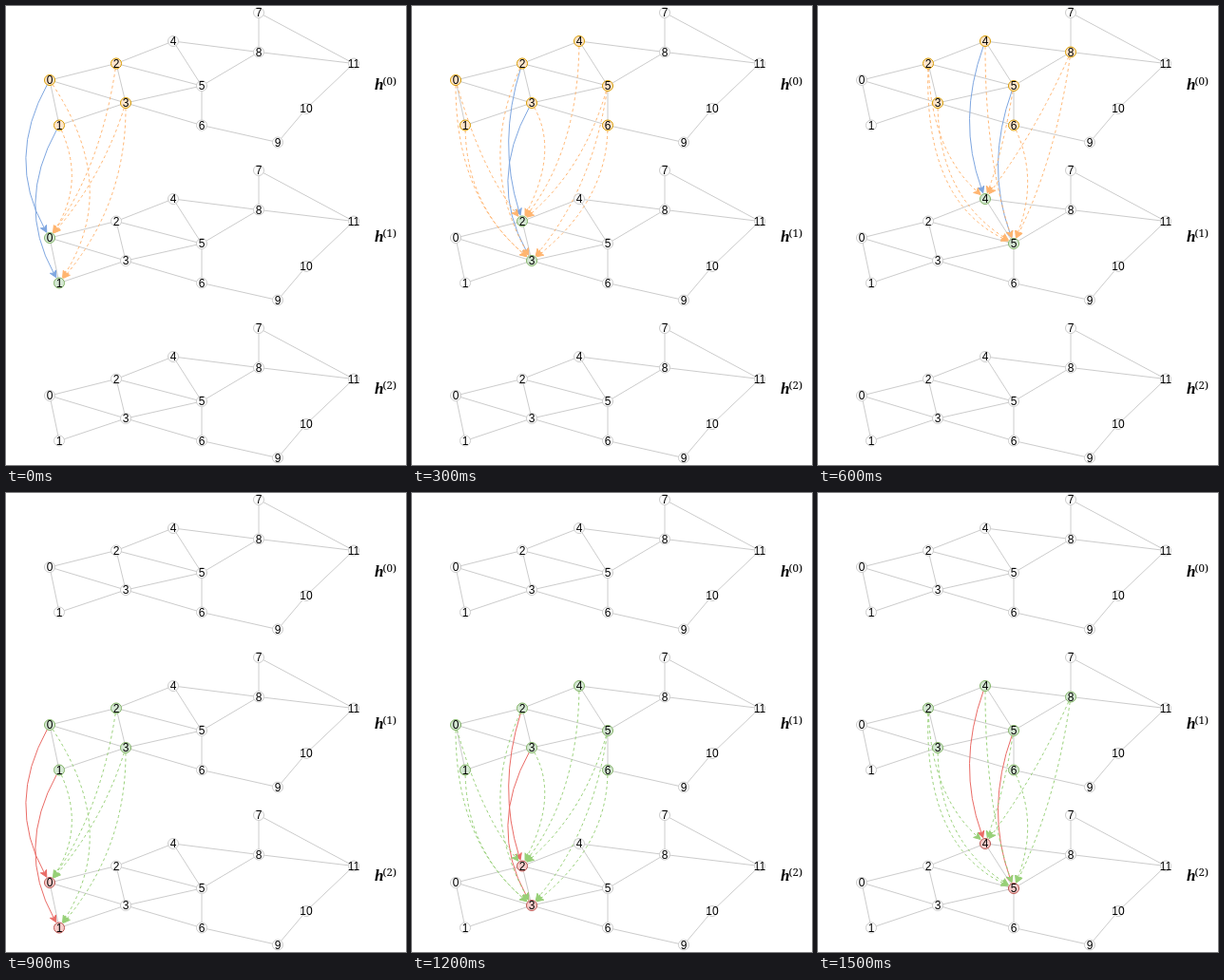
An HTML page for the animation above (1.8 s loop, 421x483 px).

```html
<!DOCTYPE html>
<html lang="en">
<head>
<meta charset="utf-8">
<title>Neighbourhood aggregation</title>
<style>
  html, body { margin: 0; width: 100%; height: 100%; overflow: hidden; background: #fff; }
  svg { display: block; }
  .edge { stroke: #ccc; }
  .num { font: 12px "Liberation Sans", Arial, sans-serif; text-anchor: middle; }
  .sym { font: italic bold 17px "Liberation Serif", Times, serif; }
  .sup { font: 11.5px "Noto Serif", serif; }
</style>
</head>
<body>
<svg id="stage" width="421" height="483" viewBox="0 0 421 483"></svg>
<script>
const STEP_MS = 300, LAYER_DY = 166, RADIUS = 5.5;

const nodes = [
  [46, 78], [56, 125.5], [116, 60.5], [126, 102], [176, 37], [206, 84],
  [206, 125.5], [266, 7], [266, 48.5], [286, 143.5], [316, 108], [366, 60.5]
];

const edges = ('0-1 0-2 0-3 1-3 2-3 2-4 2-5 3-5 3-6 4-5 4-8 5-6 5-8 ' +
  '6-9 7-8 7-11 8-11 9-10 10-11').split(' ').map(e => e.split('-'));

// Each arrow: from, to (one layer below), control point of its curve.
const groups = [
  [[0, 0, 0, 161], [1, 1, 10, 208.5],
   [1, 0, 83, 186], [2, 0, 100, 167], [3, 0, 102, 178], [0, 1, 120, 190], [3, 1, 126, 208]],
  [[2, 2, 90, 143.5], [3, 3, 80, 185],
   [0, 2, 72, 170], [3, 2, 154, 152], [4, 2, 174, 150], [5, 2, 181, 170],
   [0, 3, 46, 200], [1, 3, 58, 210], [2, 3, 69, 166], [5, 3, 190, 190], [6, 3, 204, 205]],
  [[4, 4, 146, 120], [5, 5, 176, 167],
   [2, 4, 120, 152], [5, 4, 195, 150], [8, 4, 230, 130],
   [2, 5, 112, 205], [3, 5, 128, 200], [4, 5, 176, 160], [6, 5, 232, 182], [8, 5, 250, 160]]
];

const layerColors = [
  { fill: '#ffe6cc', stroke: '#d79b00' },
  { fill: '#d5e8d4', stroke: '#82b366' },
  { fill: '#f8cecc', stroke: '#b85450' }
];
const idleColors = { fill: '#fff', stroke: '#ccc' };
const arrowColors = [
  { self: '#7ea6e0', other: '#ffb570' },
  { self: '#ea6b66', other: '#97d077' }
];

const stage = document.getElementById('stage');

function setAttrs(el, attrs) {
  for (const key in attrs) el.setAttribute(key, attrs[key]);
}

function add(parent, tag, attrs = {}, text = '') {
  const el = document.createElementNS('http://www.w3.org/2000/svg', tag);
  setAttrs(el, attrs);
  el.textContent = text;
  return parent.appendChild(el);
}

// Point at the given distance from a towards b.
function toward([ax, ay], [bx, by], distance) {
  const k = distance / Math.hypot(bx - ax, by - ay);
  return [ax + (bx - ax) * k, ay + (by - ay) * k];
}

function drawArrow(parent, [from, to, cx, cy], colors) {
  const control = [cx, cy];
  const [tx, ty] = nodes[to];
  const target = [tx, ty + LAYER_DY];
  const back = d => toward(target, control, RADIUS + 1.1 + d);
  const start = toward(nodes[from], control, RADIUS);
  const tip = back(0), notch = back(5.25), base = back(7);
  const nx = (base[1] - tip[1]) / 2, ny = (tip[0] - base[0]) / 2;
  const stroke = from === to ? colors.self : colors.other;

  add(parent, 'path', {
    d: `M${start} Q${control} ${notch}`, fill: 'none', stroke,
    'stroke-dasharray': from === to ? 'none' : '3 3'
  });
  add(parent, 'path', {
    d: `M${tip} L${base[0] + nx},${base[1] + ny} L${notch} L${base[0] - nx},${base[1] - ny} Z`,
    fill: stroke, stroke
  });
}

const edgeLayer = add(stage, 'g');
const arrowLayer = add(stage, 'g');
const nodeLayer = add(stage, 'g');

const circles = [0, 1, 2].map(layer => {
  const dy = layer * LAYER_DY;
  for (const [a, b] of edges) {
    add(edgeLayer, 'line', {
      class: 'edge', x1: nodes[a][0], y1: nodes[a][1] + dy, x2: nodes[b][0], y2: nodes[b][1] + dy
    });
  }
  const labelY = 88 + layer * 160;
  add(stage, 'text', { class: 'sym', x: 388, y: labelY }, 'h');
  add(stage, 'text', { class: 'sup', x: 396.5, y: labelY - 5 }, `(${layer})`);
  return nodes.map(([x, y], i) => {
    const circle = add(nodeLayer, 'circle', { cx: x, cy: y + dy, r: RADIUS });
    add(nodeLayer, 'text', { class: 'num', x, y: y + dy + 4.3 }, i);
    return circle;
  });
});

function render(step) {
  const source = Math.floor(step / 3);
  const arrows = groups[step % 3];
  const active = [new Set(), new Set(), new Set()];
  arrowLayer.replaceChildren();
  arrowLayer.setAttribute('transform', `translate(0 ${source * LAYER_DY})`);
  for (const arrow of arrows) {
    active[source].add(arrow[0]);
    active[source + 1].add(arrow[1]);
    drawArrow(arrowLayer, arrow, arrowColors[source]);
  }
  circles.forEach((row, layer) => row.forEach((circle, i) =>
    setAttrs(circle, active[layer].has(i) ? layerColors[layer] : idleColors)));
}

let shown = 0;
const startTime = performance.now();
render(shown);

function tick() {
  const step = Math.floor((performance.now() - startTime) / STEP_MS) % 6;
  if (step !== shown) render(shown = step);
  requestAnimationFrame(tick);
}
requestAnimationFrame(tick);
</script>
</body>
</html>
```
